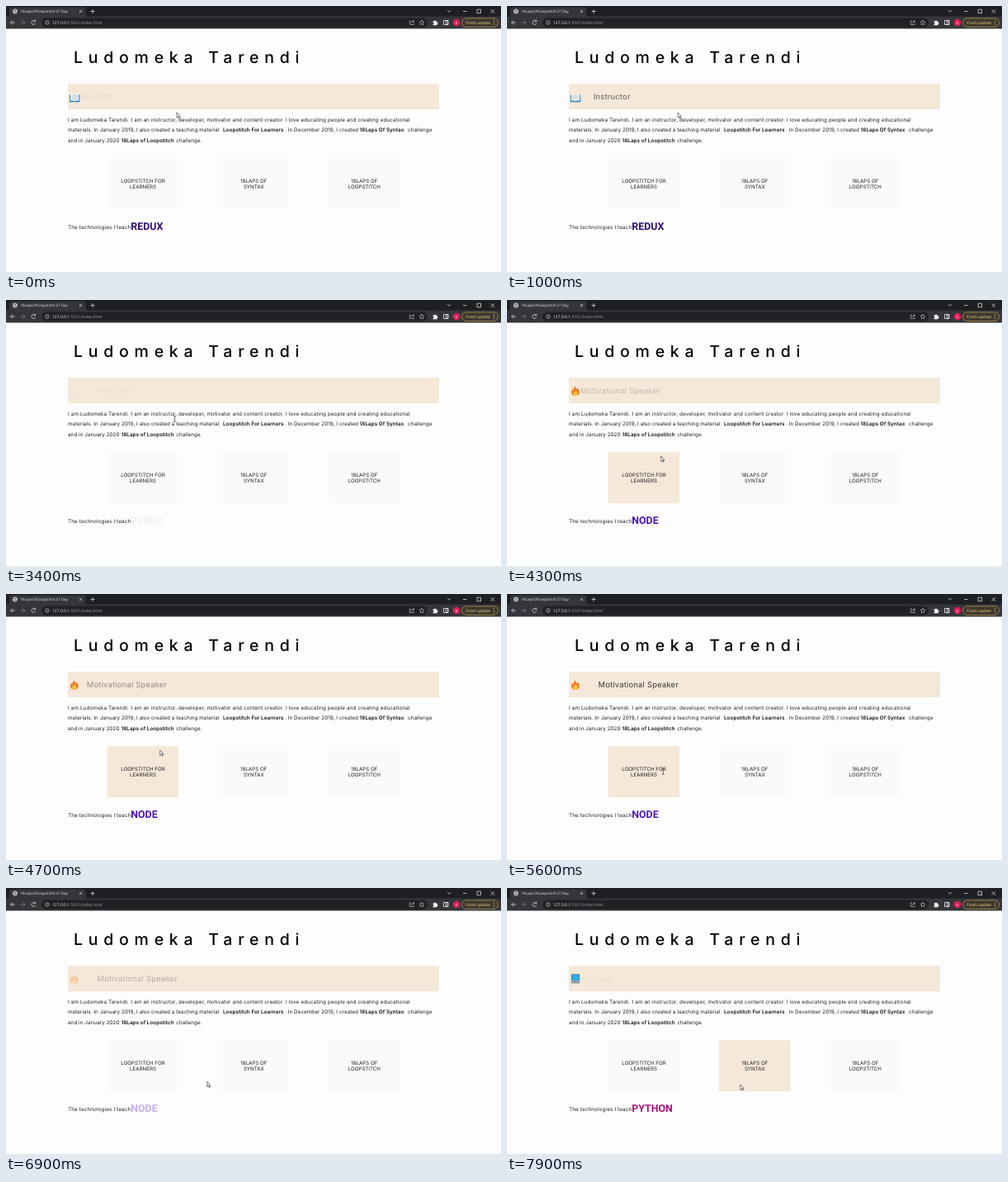
An HTML page that plays this animation: 600x322 px, repeating every 8000 ms.

```html
<!DOCTYPE html>
<html lang="en">
<head>
<meta charset="utf-8">
<title>Profile page</title>
<style>
  html, body { margin: 0; width: 100%; height: 100%; overflow: hidden; background: #fefdfe; }
  svg { display: block; width: 600px; height: 322px; text-rendering: geometricPrecision; }
  text { white-space: pre; }
  .page { font: 400 6.3px Inter, sans-serif; fill: #1f1f22; letter-spacing: .06px; }
  .page .strong { font-weight: 600; fill: #111; }
  .page .wide { letter-spacing: .13px; }
  .title { font: 500 19.5px Inter, sans-serif; letter-spacing: 6.75px; fill: #000; }
  .role { font: 400 9.4px Inter, sans-serif; letter-spacing: .22px; fill: #333; }
  .tech { font: 700 12.4px Roboto, sans-serif; }
  .card text { font-size: 6.2px; letter-spacing: 0; text-anchor: middle; }
  .ui { font: 400 5px "Open Sans", sans-serif; }
  .line { fill: none; stroke: #d4d6d9; stroke-width: .8; }
</style>
</head>
<body>
<svg viewBox="0 0 600 322">
  <rect width="600" height="322" fill="#fefdfe"/>

  <g class="ui">
    <rect width="600" height="13" fill="#1e1f22"/>
    <path d="M1 13Q4 13 4 10V4Q4 1.500 6.500 1.500H94Q96.500 1.500 96.500 4V10Q96.500 13 99.500 13Z" fill="#35363a"/>
    <rect y="12.500" width="600" height="15" fill="#35363a"/>
    <rect x="43" y="14.500" width="468" height="11.300" rx="5.600" fill="#202124"/>
    <circle cx="11" cy="6.500" r="2.900" fill="#c3c6ca"/>
    <path d="M9 5.200l2 .8 1-1.500M10 8.800l1.200-1.500 2 .3" fill="none" stroke="#35363a" stroke-width=".7"/>
    <text x="17.500" y="8.300" font-size="4.500" fill="#e8eaed">18LapsOfLoopstitch:27 Day</text>
    <path class="line" d="M89 5l3 3m0-3l-3 3M102.500 6.500h5M105 4v5"/>
    <path class="line" d="M535 5.200l2 2 2-2M554 6.500h4.500M571 4.200h4.500v4.500h-4.500zM587.500 4.200l4.600 4.600m0-4.600l-4.600 4.600"/>
    <path class="line" d="M11 20H5.500M8 17.500L5.500 20l2.500 2.500"/>
    <path class="line" d="M17.500 20H23M20.500 17.500L23 20l-2.500 2.500" style="stroke:#7d7f83"/>
    <path class="line" d="M35.300 18.300A2.500 2.500 0 1 0 35.700 21M35.700 16.800v2h-2"/>
    <circle class="line" cx="50" cy="20" r="2.300" style="stroke-width:.6"/>
    <path class="line" d="M50 19.600v1.600M50 18.500v.5" style="stroke-width:.6"/>
    <text x="56" y="21.900" fill="#9aa0a6"><tspan fill="#f1f3f4">127.0.0.1</tspan>:5501/index.html</text>
    <path class="line" d="M491 18h-1.700v4.500h5v-1.500M491 21q.2-2.500 3.500-2.500M493 17l1.800 1.500-1.800 1.500" style="stroke-width:.6"/>
    <path class="line" d="M504 17.200l.9 1.800 2 .3-1.500 1.400.4 2-1.800-1-1.800 1 .4-2-1.500-1.400 2-.3z" style="stroke-width:.6"/>
    <path d="M517.500 18.500h1.500a1 1 0 0 1 2 0h1.500v1.500a1 1 0 0 1 0 2v1.200h-5v-1.200a1 1 0 0 0 0-2z" fill="#f1f3f4"/>
    <path d="M530.500 17.500h5.200v5h-5.200zM533.500 17.500h2.200v5h-2.200z" fill="none" stroke="#f1f3f4" stroke-width=".8"/>
    <circle cx="546" cy="20" r="4.300" fill="#e01f5a"/>
    <text x="546" y="21.500" font-size="4" text-anchor="middle" fill="#fff">K</text>
    <rect x="552.500" y="14.800" width="44" height="10.600" rx="5.300" fill="#3d3930" stroke="#c39b4b" stroke-width=".7"/>
    <text x="557.300" y="21.700" font-size="4.700" fill="#fbd680">Finish update</text>
    <path d="M591.500 17.800v.1m0 2.100v.1m0 2.100v.1" stroke="#fbd680" stroke-width="1" stroke-linecap="round"/>
  </g>

  <text class="title" x="82" y="68.600">Ludomeka Tarendi</text>
  <rect x="75" y="94" width="450" height="31.200" fill="#f5e8d9"/>

  <g id="icons">
    <g>
      <path d="M77 107.500h12.200v8.800H77z" fill="#2d83b8"/>
      <path d="M78 106.800q3-.9 5.100.6 2.100-1.500 5.100-.6v7.900q-3-.7-5.100.7-2.100-1.400-5.100-.7z" fill="#eef3f6"/>
      <path d="M83.100 107.400v8M79.300 109h2.600m-2.600 1.700h2.600m-2.600 1.700h2.600m2.400-3.400h2.600m-2.600 1.700h2.600m-2.600 1.700h2.600" fill="none" stroke="#a9bac5" stroke-width=".6"/>
    </g>
    <g>
      <path d="M82.500 104.200q.4 2.200 2.500 4 .3-1 .1-1.900 2.900 2.500 2.700 5.500-.3 4-4.800 4.200-4.700-.1-5-4.400 0-2.400 1.700-4.200.1 1.200.8 1.800.6-3 2-5z" fill="#f07b24"/>
      <path d="M83 109q2.800 2.600 2.600 4.500-.3 2.200-2.600 2.300-2.500-.1-2.600-2.400 0-1.600 1.100-2.600.2.900.8 1.200.2-1.700.7-3z" fill="#ffca45"/>
    </g>
    <g>
      <rect x="78" y="104.300" width="10" height="8.300" rx=".7" fill="#596b77"/>
      <rect x="78.800" y="105.100" width="8.400" height="6.700" fill="#29b2ea"/>
      <path d="M78 112.900h10l1.200 2.600H76.800z" fill="#a5b1b8"/>
      <path d="M79 113.700h8m-8.300 1h8.600" stroke="#65747d" stroke-width=".5"/>
    </g>
  </g>
  <text class="role" id="role" y="112.800"></text>

  <g class="page" id="page"></g>
  <text class="tech" id="tech" x="151.300" y="270.700"></text>

  <g id="cursor">
    <path id="arrow" d="M0 0v6.300l1.500-1.300 1 2.200.9-.4-1-2.200h1.900z" fill="#fff" stroke="#222" stroke-width=".6"/>
    <path id="beam" d="M-1.400-3.400h1l.4.400.4-.4h1M0-3v6M-1.400 3.400h1l.4-.4.4.4h1" fill="none" stroke="#333" stroke-width=".7"/>
  </g>
</svg>
<script>
const LOOP = 8000;
const BANNER = '#f5e8d9', CARD = '#fbf9fc';
const $ = id => document.getElementById(id);

function make(parent, tag, attrs, text = '') {
  const el = document.createElementNS('http://www.w3.org/2000/svg', tag);
  for (const key in attrs) el.setAttribute(key, attrs[key]);
  el.textContent = text;
  return parent.appendChild(el);
}

// x, baseline, class, text
[
  [75, 139.9, 'wide', 'I am Ludomeka Tarendi.'],
  [151.5, 139.9, 'wide', 'I am an instructor, developer, motivator and content creator. I love educating people and creating educational'],
  [75, 152.4, '', 'materials. In January 2019, I also created a teaching material'],
  [263, 152.4, 'strong', 'Loopstitch For Learners'],
  [338, 152.4, '', '. In December 2019, I created'],
  [428.6, 152.4, 'strong', '18Laps Of Syntax'],
  [487, 152.4, '', 'challenge'],
  [75, 164.8, '', 'and in January 2020'],
  [139.5, 164.8, 'strong', '18Laps of Loopstitch'],
  [206.3, 164.8, '', 'challenge.'],
  [75, 270.3, 'wide', 'The technologies I teach'],
].forEach(([x, y, cls, text]) => make($('page'), 'text', { x, y, class: cls }, text));

const cards = [
  [122.5, 'LOOPSTITCH FOR', 'LEARNERS'],
  [256.8, '18LAPS OF', 'SYNTAX'],
  [390.8, '18LAPS OF', 'LOOPSTITCH'],
].map(([x, top, bottom]) => {
  const g = make($('page'), 'g', { class: 'card' });
  const box = make(g, 'rect', { x, y: 184.2, width: 86.5, height: 62 });
  make(g, 'text', { x: x + 43.5, y: 213.6 }, top);
  make(g, 'text', { x: x + 43.5, y: 221.2 }, bottom);
  return { x, box };
});

const slides = [
  { start: -100, role: 'Instructor', tech: 'REDUX', color: '#310a70' },
  { start: 3950, role: 'Motivational Speaker', tech: 'NODE', color: '#4b12b4' },
  { start: 7850, role: 'Developer', tech: 'PYTHON', color: '#ad107c' },
];

// time, value(s)
const roleX = [[0, 80.5], [100, 83], [750, 97.8], [1100, 104.8], [1500, 110.5]];
const roleIn = [[0, 0], [100, .1], [750, .5], [1100, .78], [1500, 1]];
const fadeOut = [[1600, 1], [3600, 0]];
const path = [
  [0, 207, 129], [2900, 207, 129], [3300, 204.6, 144], [3700, 204.6, 144],
  [4300, 186.7, 189], [5000, 186.7, 189], [5500, 189.3, 215], [6300, 189.3, 215],
  [6800, 243.8, 234.5], [7300, 243.8, 234.5], [7750, 282.8, 238],
];

function at(table, t, col = 1) {
  const i = table.findIndex(row => row[0] > t);
  if (i === 0) return table[0][col];
  if (i < 0) return table[table.length - 1][col];
  const a = table[i - 1], b = table[i];
  return a[col] + (b[col] - a[col]) * (t - a[0]) / (b[0] - a[0]);
}

const icons = [...$('icons').children];
const role = $('role'), tech = $('tech');

function drawSlide(t) {
  const n = slides.findLastIndex(s => t >= s.start);
  const slide = slides[n], age = t - slide.start, out = at(fadeOut, age);
  icons.forEach((icon, i) => icon.setAttribute('opacity', i === n ? out : 0));
  role.textContent = slide.role;
  role.setAttribute('x', at(roleX, age));
  role.setAttribute('opacity', Math.min(at(roleIn, age), out));
  tech.textContent = slide.tech;
  tech.setAttribute('fill', slide.color);
  tech.setAttribute('opacity', out);
}

function drawCursor(t) {
  const x = at(path, t), y = at(path, t, 2);
  const inCards = y > 184 && y < 246;
  let overText = y > 134 && y < 167;
  for (const card of cards) {
    const over = inCards && x > card.x && x < card.x + 86.5;
    card.box.setAttribute('fill', over ? BANNER : CARD);
    if (over && y > 207 && y < 223) overText = true;
  }
  $('cursor').setAttribute('transform', `translate(${x} ${y})`);
  $('arrow').setAttribute('visibility', overText ? 'hidden' : 'visible');
  $('beam').setAttribute('visibility', overText ? 'visible' : 'hidden');
}

const begin = performance.now();
function frame() {
  const t = (performance.now() - begin) % LOOP;
  drawSlide(t);
  drawCursor(t);
  requestAnimationFrame(frame);
}
frame();
</script>
</body>
</html>
```
